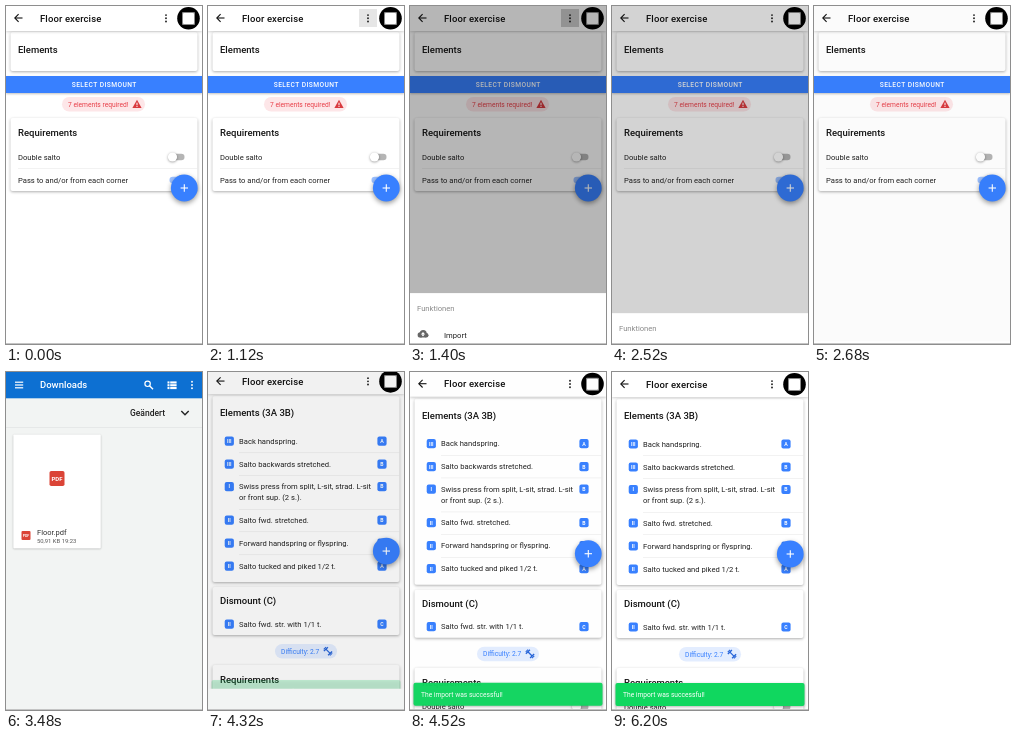
These frames come from a looping animation (196 px wide and 338 px high, 6.32 s). An HTML page with a canvas:

```html
<!DOCTYPE html>
<html lang="en">
<head>
<meta charset="utf-8">
<title>Routine import</title>
<style>
html, body { margin: 0; width: 100%; height: 100%; overflow: hidden; background: #fff; }
canvas { display: block; width: 196px; height: 338px; }
</style>
</head>
<body>
<canvas id="stage"></canvas>
<script>
const W = 196, H = 338, LOOP = 6320;
const BLUE = '#3880ff', INK = '#222', RED = '#e8404a';
const canvas = document.getElementById('stage');
const ctx = canvas.getContext('2d');
const ratio = window.devicePixelRatio || 1;
canvas.width = W * ratio;
canvas.height = H * ratio;

// Timing helpers
const clamp = v => Math.min(1, Math.max(0, v));
const span = (t, start, length) => clamp((t - start) / length);
const cubic = (s, a, b, c, d) => {
  const r = 1 - s;
  return r * r * r * a + 3 * r * r * s * b + 3 * r * s * s * c + s * s * s * d;
};

function curve(x, xs, ys) {
  let low = 0, high = 1;
  for (let i = 0; i < 24; i++) {
    const mid = (low + high) / 2;
    if (cubic(mid, ...xs) < x) low = mid; else high = mid;
  }
  return cubic(low, ...ys);
}

const sheetEase = x => curve(x, [0, .36, .04, 1], [0, .66, 1, 1]);
const slideEase = x => x < .1667
  ? curve(x, [0, .05, .1333, .1667], [0, 0, .06, .4])
  : curve(x, [.1667, .2083, .25, 1], [.4, .82, 1, 1]);
const outCubic = x => 1 - (1 - x) ** 3;

// Drawing helpers
function rect(x, y, w, h, color) {
  ctx.fillStyle = color;
  ctx.fillRect(x, y, w, h);
}

function round(x, y, w, h, r, color) {
  ctx.fillStyle = color;
  ctx.beginPath();
  ctx.roundRect(x, y, w, h, r);
  ctx.fill();
}

function disc(x, y, r, color) {
  ctx.fillStyle = color;
  ctx.beginPath();
  ctx.arc(x, y, r, 0, Math.PI * 2);
  ctx.fill();
}

function line(points, color, width) {
  ctx.strokeStyle = color;
  ctx.lineWidth = width;
  ctx.beginPath();
  points.forEach(([x, y], i) => i ? ctx.lineTo(x, y) : ctx.moveTo(x, y));
  ctx.stroke();
}

// Places text with its capitals centred on y.
function text(str, x, y, size, { color = INK, weight = 400, align = 'left', spacing = 0 } = {}) {
  ctx.font = `${weight} ${size}px Roboto, sans-serif`;
  ctx.letterSpacing = spacing + 'px';
  ctx.textAlign = align;
  ctx.fillStyle = color;
  ctx.fillText(str, x, y + size * .355);
}

function shadowed(draw, blur, dy, alpha) {
  ctx.save();
  ctx.shadowColor = `rgba(0,0,0,${alpha})`;
  ctx.shadowBlur = blur * ratio;
  ctx.shadowOffsetY = dy * ratio;
  draw();
  ctx.restore();
}

const heading = (str, y) => text(str, 12, y, 9.5, { weight: 500, color: '#151515' });
const label = (str, x, y) => text(str, x, y, 7.63);
const card = (y, h) => shadowed(() => round(4.5, y, 187, h, 2, '#fff'), 3, 1, .32);
const divider = (y, x) => rect(x, y, 191.5 - x, .5, '#e4e4e4');

function dots(x, y, color) {
  for (const dy of [-3.2, 0, 3.2]) disc(x, y + dy, .95, color);
}

function badge(str, x, y) {
  round(x - 4.6, y - 4.6, 9.2, 9.2, 2, BLUE);
  text(str, x, y, 5.2, { color: '#fff', weight: 700, align: 'center' });
}

function toggle(y, on) {
  round(163.5, y - 3.2, 15, 6.4, 3.2, on ? '#9cc0ff' : '#b5b5b5');
  shadowed(() => disc(on ? 175 : 166.5, y, 4.6, on ? BLUE : '#fff'), 2.5, .7, .4);
}

// Screen parts
function header(highlight) {
  shadowed(() => rect(0, -10, W, 35, '#fff'), 3, .8, .25);
  line([[16.5, 12], [9, 12]], '#111', 1.1);
  line([[12.6, 8.2], [8.8, 12], [12.6, 15.8]], '#111', 1.1);
  text('Floor exercise', 34, 12.3, 9.5, { weight: 500, color: '#111', spacing: .12 });
  if (highlight > 0) rect(151, 3, 18, 18, `rgba(0,0,0,${.2 * highlight})`);
  dots(160, 12.3, '#222');
  disc(182.5, 12.3, 11.3, '#000');
  round(176, 6, 13, 13, 1, '#8a8a8a');
  round(177, 7, 11, 11, 1, '#fff');
}

function fab() {
  shadowed(() => disc(178.3, 182, 13.4, BLUE), 5, 2, .4);
  line([[174.6, 182], [182, 182]], '#fff', 1.1);
  line([[178.3, 178.3], [178.3, 185.7]], '#fff', 1.1);
}

function requirements(y) {
  card(y, 73);
  heading('Requirements', y + 14.5);
  label('Double salto', 12, y + 39);
  toggle(y + 39, false);
  divider(y + 50, 12);
  label('Pass to and/or from each corner', 12, y + 62);
  toggle(y + 62, true);
}

function warning() {
  ctx.fillStyle = '#d93a3f';
  ctx.beginPath();
  ctx.moveTo(131, 93.8);
  ctx.lineTo(135.6, 102);
  ctx.lineTo(126.4, 102);
  ctx.fill();
  rect(130.5, 96.7, 1, 2.6, '#fff');
  rect(130.5, 100, 1, 1, '#fff');
}

function emptyRoutine() {
  card(26, 39);
  heading('Elements', 44);
  shadowed(() => rect(0, 70, W, 17, BLUE), 2, .8, .25);
  text('SELECT DISMOUNT', 98.2, 78.4, 6.68, { color: '#fff', weight: 500, align: 'center', spacing: .4 });
  round(56, 91, 83, 14.5, 7.2, '#fde6e8');
  text('7 elements required!', 62, 98.3, 6.68, { color: RED });
  warning();
  requirements(112);
}

const ELEMENTS = [
  [72, 'III', 'Back handspring.', 'A'],
  [95, 'III', 'Salto backwards stretched.', 'B'],
  [117.5, 'I', 'Swiss press from split, L-sit, strad. L-sit', 'B'],
  [151, 'II', 'Salto fwd. stretched.', 'B'],
  [174, 'II', 'Forward handspring or flyspring.', 'B'],
  [197, 'II', 'Salto tucked and piked 1/2 t.', 'A']
];

function elementRow([y, group, name, value]) {
  badge(group, 21.3, y);
  label(name, 31, y);
  badge(value, 174, y);
}

function dumbbell(x, y) {
  const color = '#2563d8';
  ctx.save();
  ctx.translate(x, y);
  ctx.rotate(Math.PI / 4);
  rect(-3, -.6, 6, 1.2, color);
  for (const side of [-1, 1]) {
    rect(side * 3 - .7, -2.8, 1.4, 5.6, color);
    rect(side * 4.4 - .5, -1.6, 1, 3.2, color);
  }
  ctx.restore();
}

function fullRoutine() {
  card(27, 186);
  heading('Elements (3A 3B)', 44);
  [83.5, 106, 140, 162.5, 185.5].forEach(y => divider(y, 31));
  ELEMENTS.forEach(elementRow);
  label('or front sup. (2 s.).', 31, 128.5);
  card(218, 48);
  heading('Dismount (C)', 232);
  elementRow([255, 'II', 'Salto fwd. str. with 1/1 t.', 'C']);
  round(67, 275, 62, 14.5, 7.2, '#e3edff');
  text('Difficulty: 2.7', 73, 282.3, 6.68, { color: BLUE });
  dumbbell(120, 282.2);
  requirements(296);
}

function toast(alpha) {
  ctx.save();
  ctx.globalAlpha = alpha;
  shadowed(() => round(3.5, 311, 189, 23, 2, '#10d75f'), 3, 1, .3);
  text('The import was successful!', 11, 322.8, 6.68, { color: '#fff' });
  ctx.restore();
}

function cloudIcon(x, y) {
  const color = '#666';
  disc(x - 2.8, y + .8, 2.6, color);
  disc(x + .2, y - .7, 3.5, color);
  disc(x + 3.2, y + 1.1, 2.3, color);
  rect(x - 2.8, y, 6, 3.4, color);
  ctx.fillStyle = '#fff';
  ctx.beginPath();
  ctx.moveTo(x, y - 2);
  ctx.lineTo(x + 2.2, y + .4);
  ctx.lineTo(x - 2.2, y + .4);
  ctx.fill();
  rect(x - .8, y + .3, 1.6, 1.7, '#fff');
}

function actionSheet(open) {
  rect(0, 0, W, H, `rgba(0,0,0,${.32 * open})`);
  ctx.save();
  ctx.translate(0, H - 57 * open);
  rect(0, 0, W, 60, '#fff');
  text('Funktionen', 7, 15, 7.63, { color: '#8a8a8a' });
  cloudIcon(13, 41);
  label('Import', 34, 42);
  ctx.restore();
}

function pdfIcon(x, y, size) {
  round(x - size / 2, y - size / 2, size, size, size * .12, '#db4437');
  text('PDF', x, y, size * .4, { color: '#fff', weight: 700, align: 'center' });
}

function downloads() {
  rect(0, 0, W, H, '#f2f4f3');
  rect(0, 0, W, 26.3, '#0d70d2');
  for (const y of [10.2, 13, 15.8]) rect(9, y - .6, 8.2, 1.2, '#fff');
  text('Downloads', 34, 13, 9.5, { color: '#fff', weight: 500 });
  ctx.strokeStyle = '#fff';
  ctx.lineWidth = 1.2;
  ctx.beginPath();
  ctx.arc(141.6, 11.8, 2.7, 0, Math.PI * 2);
  ctx.stroke();
  line([[143.5, 13.7], [147, 17.2]], '#fff', 1.4);
  for (const y of [9.4, 12.2, 15]) {
    rect(161.5, y, 2, 2.1, '#fff');
    rect(164.2, y, 6.4, 2.1, '#fff');
  }
  dots(186, 13, '#fff');

  text('Geändert', 124, 41, 8.5, { weight: 500 });
  line([[175.3, 39], [179, 42.8], [182.7, 39]], '#222', 1.4);
  rect(0, 55, W, .6, '#dfe2e1');

  shadowed(() => round(7.3, 62.5, 87.5, 114, 1, '#fff'), 2, .6, .28);
  pdfIcon(51, 106.5, 15);
  pdfIcon(20, 163.5, 9);
  text('Floor.pdf', 31, 160, 7.5, { color: '#333' });
  text('50,91 KB 19:23', 31, 169, 5.9, { color: '#555' });
}

function routinePage(t, shift, imported) {
  ctx.save();
  ctx.translate(0, shift);
  rect(0, 0, W, H + 10, '#fff');
  if (imported) fullRoutine(); else emptyRoutine();
  header(imported ? 0 : outCubic(span(t, 1080, 200)) * (1 - span(t, 1460, 160)));
  fab();
  if (imported) toast(sheetEase(span(t, 4280, 400)));
  ctx.restore();
}

function downloadsPage(shift, top) {
  ctx.save();
  ctx.beginPath();
  ctx.rect(0, top, W, H - top);
  ctx.clip();
  ctx.translate(0, shift);
  downloads();
  ctx.restore();
}

function render(t) {
  const OPEN = 2890, CLOSE = 4210;
  const imported = t >= CLOSE;
  const slide = slideEase(span(t, imported ? CLOSE : OPEN, 600));
  const reveal = outCubic(span(t, imported ? CLOSE : OPEN, 160));
  const away = imported ? 1 - slide : slide;

  ctx.setTransform(ratio, 0, 0, ratio, 0, 0);
  routinePage(t, -6.6 * away, imported);
  const sheet = sheetEase(span(t, 1240, 400)) * (1 - sheetEase(span(t, 2440, 450)));
  if (sheet > 0) actionSheet(sheet);
  if (away > 0) rect(0, 0, W, H, `rgba(0,0,0,${.12 * away})`);

  if (!imported && t >= OPEN) downloadsPage(14 * (1 - slide), 326 * (1 - reveal));
  if (imported && reveal < 1) downloadsPage(14 * slide, 326 * reveal);
  rect(0, 337, W, 1, '#c4c4c4');
}

const began = performance.now();
function tick() {
  render((performance.now() - began) % LOOP);
  requestAnimationFrame(tick);
}
tick();
</script>
</body>
</html>
```
